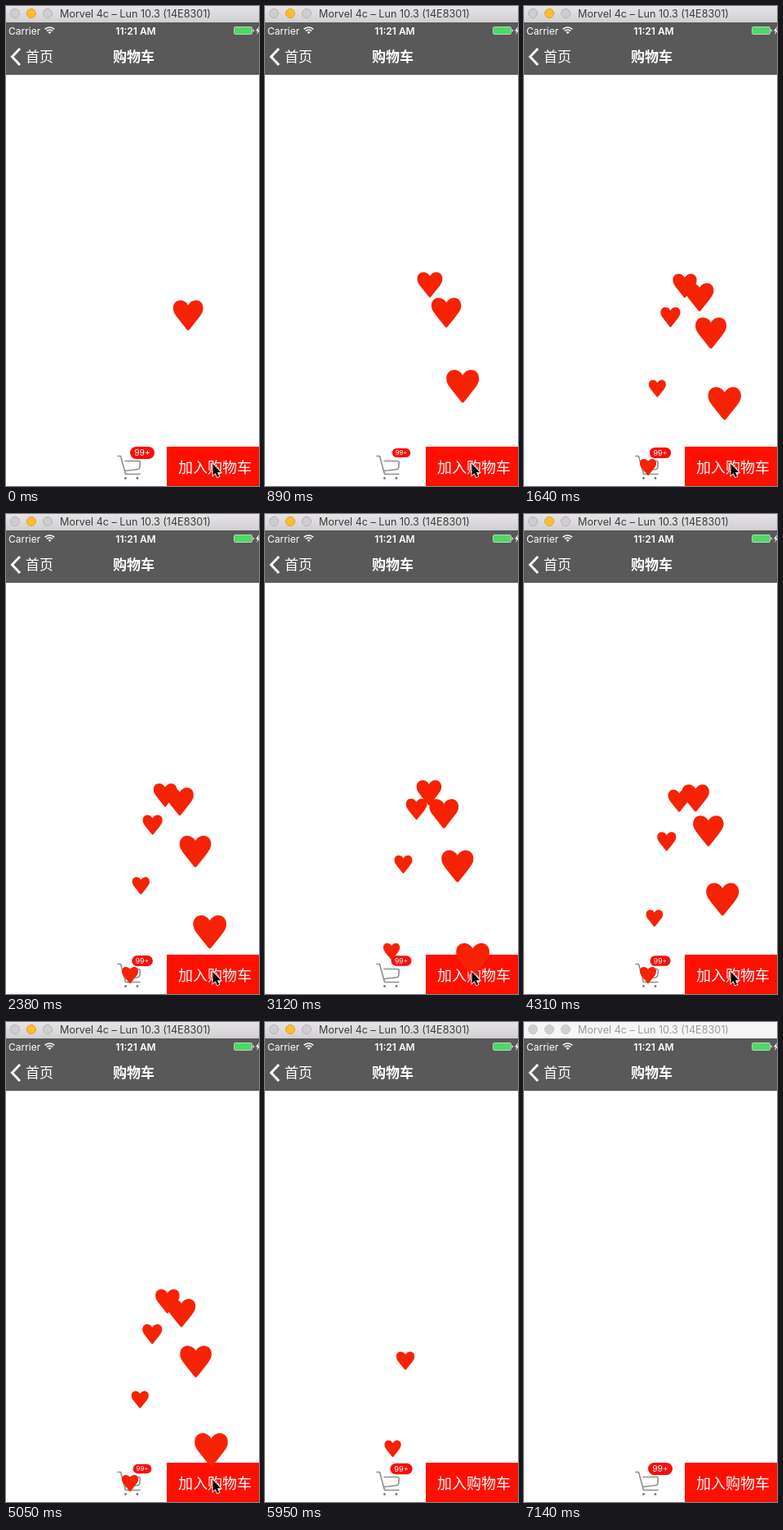
Recreate the animation shown at these times as an HTML page with a canvas. Size 310 px wide and 586 px high, loop 7240 ms.

```html
<!DOCTYPE html>
<html lang="zh">
<head>
<meta charset="utf-8">
<title>购物车</title>
<style>
  html, body { margin: 0; width: 100%; height: 100%; overflow: hidden; background: #fff; }
  canvas { display: block; width: 310px; height: 586px; }
</style>
</head>
<body>
<canvas id="stage"></canvas>
<script>
const W = 310, H = 586, LOOP = 7240;
const FLIGHT = 985;      // ms from button to cart
const REMOVED = 1065;    // ms until a heart disappears and the badge pulses
const PULSE = 100;       // ms for half a pulse
const BLUR_AT = 7140;    // window loses focus
const LATIN = 'Inter, "Open Sans", sans-serif';
const CJK = '"Noto Sans CJK SC", "Noto Sans CJK", sans-serif';

// moments at which the button is tapped
const taps = [
  -290, 407, 591, 766, 930, 1100, 1267, 1392, 1536, 1681, 1831, 1997,
  2168, 2319, 2480, 2627, 2795, 2941, 3100, 3256, 3409, 3563, 3714, 3903,
  4044, 4195, 4347, 4528, 4686, 4843, 5004, 5165
];

const canvas = document.getElementById('stage');
const ctx = canvas.getContext('2d');
const ratio = window.devicePixelRatio || 1;
canvas.width = W * ratio;
canvas.height = H * ratio;

function rect(x, y, w, h, fill) {
  ctx.fillStyle = fill;
  ctx.fillRect(x, y, w, h);
}

function pill(x, y, w, h, r, fill) {
  ctx.beginPath();
  ctx.roundRect(x, y, w, h, r);
  ctx.fillStyle = fill;
  ctx.fill();
}

function disc(x, y, r, fill, edge) {
  ctx.beginPath();
  ctx.arc(x, y, r, 0, Math.PI * 2);
  ctx.fillStyle = fill;
  ctx.fill();
  if (edge) stroke(edge, 1);
}

function stroke(color, width) {
  ctx.strokeStyle = color;
  ctx.lineWidth = width;
  ctx.stroke();
}

function polyline(points) {
  ctx.beginPath();
  points.forEach(([x, y]) => ctx.lineTo(x, y));
}

function text(str, x, y, font, color, align = 'left') {
  ctx.font = font;
  ctx.fillStyle = color;
  ctx.textAlign = align;
  ctx.textBaseline = 'alphabetic';
  ctx.fillText(str, x, y);
}

function titleBar(active) {
  if (active) {
    const shade = ctx.createLinearGradient(0, 0, 0, 20);
    shade.addColorStop(0, '#e6e4e6');
    shade.addColorStop(1, '#d1cfd1');
    rect(0, 0, W, 20, shade);
  } else {
    rect(0, 0, W, 20, '#f6f6f6');
  }
  const grey = active ? ['#cfcdcf', '#b3b1b3'] : ['#d0d0d0', '#c4c4c4'];
  disc(11, 9, 5.5, ...grey);
  disc(31, 9, 5.5, ...(active ? ['#fdbd2f', '#dd9f2a'] : grey));
  disc(51, 9, 5.5, ...grey);
  text('Morvel 4c – Lun 10.3 (14E8301)', 66, 14, '12.6px ' + LATIN, active ? '#3c3c3c' : '#9b9b9b');
}

function wifi(x, y) {
  const a = -Math.PI / 2, spread = 0.8;
  ctx.lineCap = 'butt';
  for (const r of [5, 8]) {
    ctx.beginPath();
    ctx.arc(x, y, r, a - spread, a + spread);
    stroke('#fff', 1.7);
  }
  ctx.beginPath();
  ctx.moveTo(x, y);
  ctx.arc(x, y, 2.8, a - spread, a + spread);
  ctx.fillStyle = '#fff';
  ctx.fill();
}

function battery() {
  ctx.beginPath();
  ctx.roundRect(279.5, 25.5, 22, 9, 1.5);
  stroke('#c9c9c9', 1);
  pill(280, 26, 21, 8, 1, '#4cd964');
  pill(302.5, 28.5, 1.5, 3, 0.7, '#ddd');
  polyline([[310, 25], [306, 30.5], [308.5, 30.5], [307, 35], [311, 29.5], [309, 29.5]]);
  ctx.fillStyle = '#fff';
  ctx.fill();
}

function header() {
  rect(0, 20, W, 64, '#595959');
  text('Carrier', 3, 34.5, '12px ' + LATIN, '#fff');
  wifi(53.5, 34);
  text('11:21 AM', 159, 34.5, '600 12px ' + LATIN, '#fff', 'center');
  battery();
  ctx.lineJoin = 'miter';
  polyline([[17, 52], [7.5, 62], [17, 72]]);
  stroke('#fff', 3);
  text('首页', 24, 68, '17px ' + CJK, '#fff');
  text('购物车', 156.5, 68, '600 17px ' + CJK, '#fff', 'center');
}

function cart() {
  ctx.lineJoin = ctx.lineCap = 'round';
  polyline([[137, 549.5], [140.5, 549.5], [146.5, 571.5], [164, 571.5]]);
  stroke('#8f8f8f', 1.6);
  ctx.beginPath();
  ctx.moveTo(146, 555.5);
  ctx.lineTo(162, 555.5);
  ctx.quadraticCurveTo(164.5, 555.5, 164.3, 558);
  ctx.lineTo(163.8, 563);
  ctx.quadraticCurveTo(163.5, 565.5, 161, 565.8);
  ctx.lineTo(146, 567.5);
  stroke('#8f8f8f', 1.6);
  disc(146.5, 576.5, 1.4, '#777');
  disc(161, 576.5, 1.4, '#777');
}

function badgeScale(t) {
  const ages = taps.map(s => t - s - REMOVED).filter(a => a >= 0);
  const age = Math.min(...ages);
  if (age >= PULSE * 4) return 1;
  const phase = (age / PULSE) % 2;
  return 1 - 0.3 * (phase < 1 ? phase : 2 - phase);
}

function badge(scale) {
  ctx.save();
  ctx.translate(167, 545.5);
  ctx.scale(scale, scale);
  pill(-15, -7.5, 30, 15, 7.5, '#fa0d08');
  text('99+', 0, 3.7, '10.3px ' + LATIN, '#fff', 'center');
  ctx.restore();
}

function buyButton() {
  rect(197, 538, 113, 48, '#ff0f00');
  text('加入购物车', 211, 569.5, '18px ' + CJK, '#fff');
}

function heart(x, y, size) {
  ctx.save();
  ctx.translate(x, y);
  ctx.scale(size, size);
  ctx.beginPath();
  for (const side of [1, -1]) {
    ctx.moveTo(0, -0.34);
    ctx.bezierCurveTo(side * 0.06, -0.44, side * 0.15, -0.5, side * 0.26, -0.5);
    ctx.bezierCurveTo(side * 0.4, -0.5, side * 0.5, -0.39, side * 0.5, -0.24);
    ctx.bezierCurveTo(side * 0.5, -0.1, side * 0.43, -0.02, side * 0.34, 0.1);
    ctx.lineTo(side * 0.05, 0.465);
    ctx.quadraticCurveTo(side * 0.02, 0.5, 0, 0.5);
  }
  ctx.fillStyle = '#f62204';
  ctx.fill();
  ctx.restore();
}

const quad = (a, b, c, p) => a * (1 - p) ** 2 + 2 * b * p * (1 - p) + c * p * p;

function hearts(t) {
  for (const start of taps) {
    const age = t - start;
    if (age < 0 || age >= REMOVED) continue;
    const p = Math.min(1, age / FLIGHT);
    heart(quad(257, 197.5, 152, p), quad(562, 118, 563, p), 30.5 + 10.3 * Math.cos(Math.PI * p));
  }
}

function pointer(x, y) {
  ctx.save();
  ctx.translate(x, y);
  polyline([[0.5, 0], [0.5, 14], [3.6, 11.2], [5.8, 16.2], [8.2, 15.2], [6, 10.3], [10.2, 10.3]]);
  ctx.closePath();
  ctx.lineJoin = 'miter';
  stroke('#fff', 1.8);
  ctx.fillStyle = '#000';
  ctx.fill();
  ctx.restore();
}

// the picture is refreshed about every 150 ms, now and then after 140
function stepTime(t) {
  const at = k => 150 * k - 10 * Math.min(6, Math.floor((k + 5.5) / 7.5));
  let k = Math.floor(t / 150);
  while (at(k + 1) <= t) k++;
  return at(k);
}

function draw(now) {
  const clock = now % LOOP;
  const t = stepTime(clock);
  ctx.setTransform(ratio, 0, 0, ratio, 0, 0);
  rect(0, 0, W, H, '#fff');
  titleBar(clock < BLUR_AT);
  header();
  cart();
  badge(badgeScale(t));
  buyButton();
  hearts(t);
  if (t < 5500) pointer(253, 559);
  else if (t < 5650) pointer(281, 571);
}

const begin = performance.now();
function loop() {
  draw(performance.now() - begin);
  requestAnimationFrame(loop);
}
loop();
</script>
</body>
</html>
```
